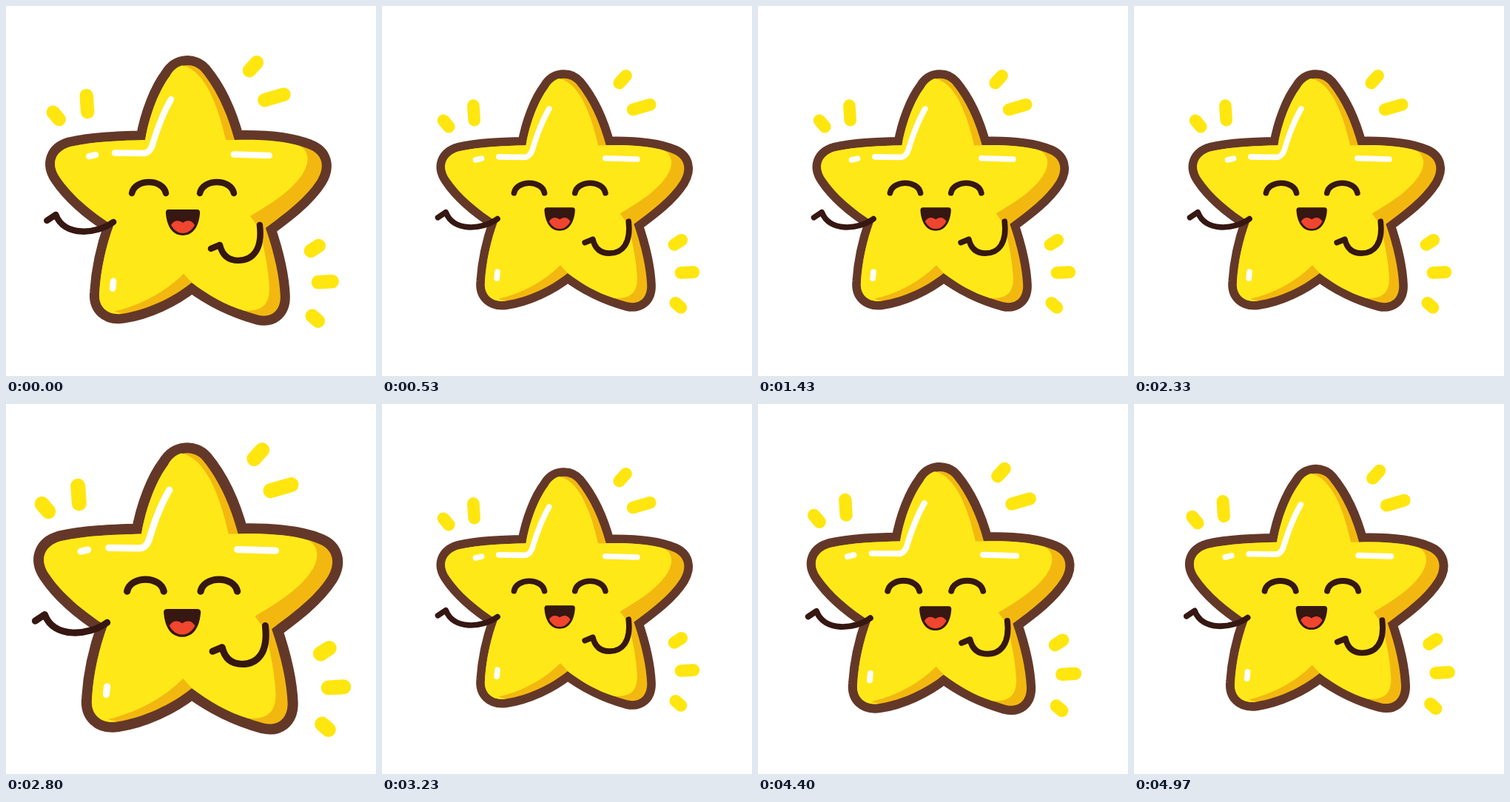
An HTML page with a canvas that plays this animation: 500 px wide and 500 px high, repeating every 5.01 s.

```html
<!DOCTYPE html>
<html lang="en">
<head>
<meta charset="utf-8">
<title>Happy star</title>
<style>
  html, body { margin: 0; width: 100%; height: 100%; overflow: hidden; background: #fff; }
  canvas { display: block; width: 500px; height: 500px; }
</style>
</head>
<body>
<canvas id="stage" width="500" height="500"></canvas>
<script>
const ctx = document.getElementById('stage').getContext('2d');

const LOOP = 5010, STEP = 100 / 3, STEPS = 150;
const BEAT = 27, PEAK = 5;
const BIG = 1.1385, SHRINK = 0.2544;

const BROWN = '#643829', YELLOW = '#ffe818', ORANGE = '#f3b810';
const DARK = '#361712', RED = '#f0452f', SPARK = '#ffe60f';

// The left side is shared by the whole body and its lit part.
const leftSide = `C136 419 124 406 126 387 C128 355 135 325 145 297
  C115 278 88 255 72 231 C60 213 66 196 87 190 C118 183 155 182 188 181 Z`;

const body = new Path2D(`M188 181 C194 145 208 112 221 95
  C232 76 254 76 265 89 C285 113 300 147 309 181
  C345 180 385 183 409 193 C428 200 432 217 421 235
  C405 260 378 280 351 300 C363 335 370 367 371 393
  C371 413 358 422 341 418 C305 408 275 392 251 374
  C225 395 190 411 158 416 ${leftSide}`);

const lit = new Path2D(`M188 181 C194 145 208 112 221 95
  C225 87 231 82 238 80 C268 86 286 132 297 181 L309 181
  C342 180 375 182 397 189 C413 198 409 216 399 230
  C383 252 357 268 330 284 L342 300
  C350 330 355 358 356 382 C356 404 346 413 322 412
  C295 404 272 390 251 374 L240 362
  C216 386 184 404 146 413 L158 416 ${leftSide}`);

const mouth = new Path2D(`M220 275 H258 Q263 275 262 281
  C260 302 250 310 239 310 C228 310 218 302 216 281 Q215 275 220 275 Z`);
const tongue = new Path2D(`M223 296 C227 289 234 289 239 293
  C244 289 251 289 255 296 C251 303 246 307 239 307
  C232 307 227 303 223 296 Z`);

const limbs = new Path2D(`M170 253 C174 233 212 233 216 253
  M262 253 C266 233 304 233 308 253
  M145 292 C122 309 78 312 67 282 L55 290
  M343 296 C347 330 333 344 314 344 C300 344 292 336 289 323 L277 328`);

const shine = new Path2D(`M223 126 C210 148 203 170 197 190
  Q193 199 186 199 L147 198.5 M112 203 L121 201
  M308 200.5 L356 202 M145 372 L144 382`);

const sparks = new Path2D(`M63.5 143.5 L71.5 153 M108.5 121 L110 143
  M329 87 L339 76 M349.5 127 L375.5 119.5 M412 331 L423 324
  M422 373.5 L441 372.5 M414 419 L422 426`);

function fill(path, color) {
  ctx.fillStyle = color;
  ctx.fill(path);
}

function stroke(path, color, width) {
  ctx.strokeStyle = color;
  ctx.lineWidth = width;
  ctx.stroke(path);
}

function scaleAt(time) {
  const n = Math.min(STEPS - 1, Math.floor((time + 4) / STEP));
  return BIG - SHRINK * Math.abs(Math.sin(Math.PI * (n - PEAK) / BEAT));
}

function draw(time) {
  const s = scaleAt(time);
  ctx.setTransform(1, 0, 0, 1, 0, 0);
  ctx.fillStyle = '#fff';
  ctx.fillRect(0, 0, 500, 500);
  ctx.setTransform(s, 0, 0, s, 250 - 250 * s, 250 - 250 * s);
  ctx.lineCap = ctx.lineJoin = 'round';

  stroke(sparks, SPARK, 18.5);
  stroke(body, BROWN, 26);
  fill(body, ORANGE);
  fill(lit, YELLOW);
  stroke(shine, '#fff', 8.5);
  fill(mouth, DARK);
  fill(tongue, RED);
  stroke(limbs, DARK, 8.5);
}

const start = performance.now();
function tick() {
  draw((performance.now() - start) % LOOP);
  requestAnimationFrame(tick);
}
tick();
</script>
</body>
</html>
```
